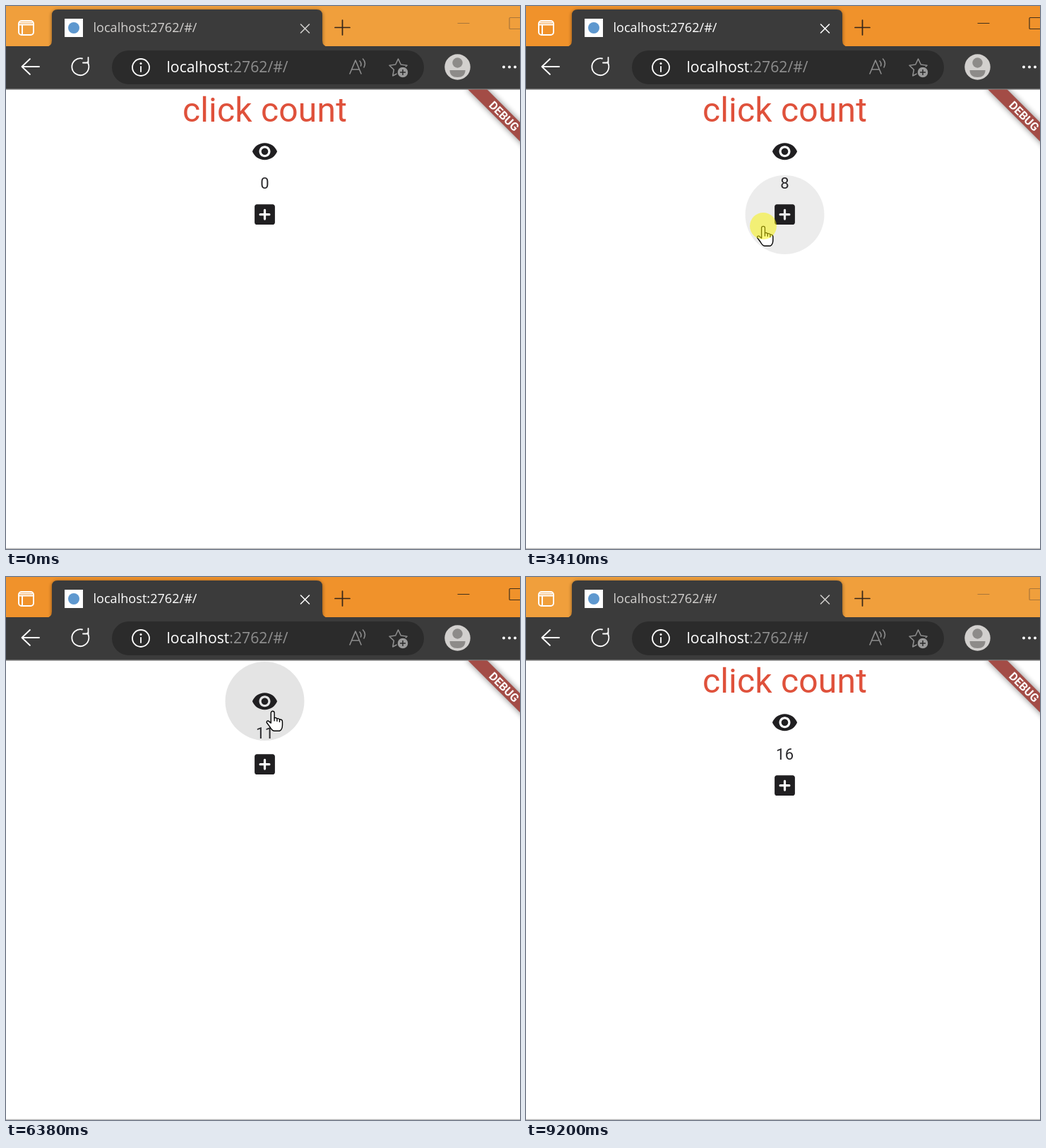
An HTML page that plays this animation: 728 px wide and 770 px high, repeating every 9.27 s.

```html
<!DOCTYPE html>
<html lang="en">
<head>
<meta charset="utf-8">
<title>click count</title>
<style>
  html, body { margin: 0; width: 100%; height: 100%; overflow: hidden; background: #fff; }
  svg { display: block; width: 728px; height: 770px; }
  .ui { font-family: "Open Sans", "Noto Sans", sans-serif; }
  .app { font-family: Roboto, Arial, sans-serif; }
  .line { fill: none; stroke-linecap: round; stroke-linejoin: round; }
</style>
</head>
<body>
<svg viewBox="0 0 728 770" xmlns="http://www.w3.org/2000/svg">
  <defs>
    <filter id="soft" x="-20%" y="-100%" width="140%" height="300%"><feGaussianBlur stdDeviation="4"/></filter>
    <filter id="tabShadow" x="-5%" y="-20%" width="110%" height="140%"><feGaussianBlur stdDeviation="2"/></filter>
    <clipPath id="page"><rect y="118.5" width="728" height="652"/></clipPath>
  </defs>
  <rect width="728" height="770" fill="#fff"/>

  <!-- title bar -->
  <rect id="bar" width="728" height="58"/>
  <rect x="64" y="5" width="385" height="60" rx="9" fill="#000" opacity=".35" filter="url(#tabShadow)"/>
  <path d="M57 58Q65 57 65 49V13Q65 5 73 5H440Q448 5 448 13V49Q448 57 456 58Z" fill="#3b3b3b"/>
  <g class="line" stroke="#fff" stroke-width="1.9">
    <rect x="18" y="21" width="21" height="20" rx="4"/>
    <path d="M18 26.5H39M23 27V40M20 23.6H37"/>
  </g>
  <rect x="83" y="18" width="26" height="26" fill="#fff"/>
  <circle cx="96" cy="31" r="8" fill="#5e98cf"/>
  <text id="tabText" class="ui" x="123.5" y="37" font-size="18.1">localhost:2762/#/</text>
  <path id="tabClose" class="line" d="M417.500 26L429.500 38M429.500 26L417.500 38" stroke-width="1.6"/>
  <path class="line" d="M466 30.500H487M476.500 20V41" stroke="#33251a" stroke-width="1.7"/>
  <g id="winButtons" class="line" stroke-width="1.2">
    <path d="M640 24.500H656"/><rect x="713" y="16.500" width="17" height="16" rx="1"/>
  </g>

  <!-- toolbar -->
  <rect y="57" width="728" height="61" fill="#3b3b3b"/>
  <rect y="117" width="728" height="1.600" fill="#6a6a6a"/>
  <rect x="150" y="63" width="442" height="48" rx="24" fill="#2b2b2b"/>
  <g class="line" stroke="#fff" stroke-width="1.8">
    <path d="M47 86H22.500M34 75L22.500 86L34 97"/>
    <path d="M115.300 79.500A12 12 0 1 1 108 74.500M116.500 73V80.500H109"/>
    <circle cx="191" cy="87" r="12"/>
    <path d="M191 86V93"/>
  </g>
  <circle cx="191" cy="81.500" r="1.500" fill="#fff"/>
  <text class="ui" x="227.500" y="94" font-size="21.200" fill="#fff">localhost<tspan fill="#8f8f8f">:2762/#/</tspan></text>
  <g class="line" stroke="#8d8d8d" stroke-width="1.600">
    <path d="M487 96L495 77L503 96M490 90H500M501 78Q504 81 502.500 85M505.500 75Q510.500 80 507 87"/>
    <path d="M555.500 75L559.300 83L568 84.200L561.700 90.300L563.200 99L555.500 95L547.800 99L549.300 90.300L543 84.200L551.700 83Z"/>
  </g>
  <circle cx="562" cy="94" r="8" fill="#9a9a9a" stroke="#2b2b2b" stroke-width="1.500"/>
  <path d="M558 94H566M562 90V98" stroke="#2b2b2b" stroke-width="1.500"/>
  <circle cx="639.500" cy="86.500" r="18.200" fill="#d2d0ce"/>
  <circle cx="639.500" cy="80.500" r="7.200" fill="#8d8b89"/>
  <path d="M628.500 91H650.500Q650.500 101 639.500 101T628.500 91Z" fill="#8d8b89"/>
  <g fill="#fff"><circle cx="705" cy="86.500" r="2"/><circle cx="713" cy="86.500" r="2"/><circle cx="721" cy="86.500" r="2"/></g>

  <!-- page -->
  <text id="heading" class="app" x="366.500" y="164" font-size="48" letter-spacing=".2" text-anchor="middle" fill="#df513b">click count</text>
  <g id="body">
    <circle id="eyeHover" cx="366.500" cy="206"/>
    <circle id="plusHover" cx="366.500" cy="296"/>
    <g id="ripples"></g>
    <g fill="#201f21" fill-rule="evenodd">
      <path transform="translate(347.300 187) scale(1.600)" d="M12 4.500C7 4.500 2.730 7.610 1 12c1.730 4.390 6 7.500 11 7.500s9.270-3.110 11-7.500c-1.730-4.390-6-7.500-11-7.500zM12 17c-2.760 0-5-2.240-5-5s2.240-5 5-5 5 2.240 5 5-2.240 5-5 5zm0-8c-1.660 0-3 1.340-3 3s1.340 3 3 3 3-1.340 3-3-1.340-3-3-3z"/>
      <path transform="translate(347.300 276.500) scale(1.600)" d="M19 3H5c-1.100 0-2 .9-2 2v14c0 1.100.9 2 2 2h14c1.100 0 2-.9 2-2V5c0-1.100-.9-2-2-2zm-3 10h-3v3c0 .55-.45 1-1 1s-1-.45-1-1v-3H8c-.55 0-1-.45-1-1s.45-1 1-1h3V8c0-.55.45-1 1-1s1 .45 1 1v3h3c.55 0 1 .45 1 1s-.45 1-1 1z"/>
    </g>
    <text id="count" class="app" x="366.700" y="259" font-size="22" letter-spacing=".4" text-anchor="middle" fill="#2b2a2d"></text>
  </g>
  <g clip-path="url(#page)">
    <g transform="translate(705.500 156) rotate(45)">
      <rect x="-64" y="-9.600" width="128" height="19.200" opacity=".5" filter="url(#soft)"/>
      <rect x="-64" y="-9.600" width="128" height="19.200" fill="#a34c46"/>
      <text class="app" y="5.800" font-size="16.300" font-weight="700" text-anchor="middle" fill="#fff">DEBUG</text>
    </g>
  </g>
  <rect y="768.800" width="728" height="1.200" fill="#b9b9b9"/>

  <!-- pointer -->
  <g id="pointer">
    <g id="hand" class="line" stroke="#000" stroke-width="1.400">
      <path fill="#fff" d="M-2.400 2.800A2.400 2.400 0 0 1 2.400 2.800V10Q4.600 8.800 6.200 11Q8.600 10 9.800 12.200Q13.800 11.600 13.800 15.500V20Q13.800 26 10 28.300H2Q-1 28-4 22.500L-8.400 16.600Q-8.800 13.800-6 14.200L-2.400 17.200Z"/>
      <path d="M2.400 10V14M6.200 11V14.500M9.800 12.200V15.500"/>
    </g>
    <path id="arrow" d="M.5 .5V23L5.600 18.200L9 26.300L12.500 24.800L9.200 17H16.500Z" fill="#fff" stroke="#000" stroke-width="1.200"/>
    <circle id="glow" r="19" fill="#faf40a" opacity=".52"/>
  </g>
</svg>
<script>
const LOOP = 9270, CX = 366.5, EYE = 206, PLUS = 296, LIFT = 30;
const $ = id => document.getElementById(id);
const set = (el, attrs) => { for (const k in attrs) el.setAttribute(k, attrs[k]); };
const show = (el, on) => set(el, { visibility: on ? "inherit" : "hidden" });
const clamp = v => Math.max(0, Math.min(1, v));
const series = (start, step, n) => Array.from({ length: n }, (_, i) => start + step * i);

// Pointer stops: time, x, y
const path = [
  [300, 712, 785], [370, 690, 735], [510, 580, 650], [760, 500, 430], [1050, 403, 190],
  [1190, 384, 158], [1260, 384, 151], [1470, 364, 274], [1640, 364, 282], [2380, 368, 284],
  [2720, 368, 284], [2900, 372, 325], [3060, 368, 358], [3200, 350, 339], [3410, 336, 312],
  [3700, 340, 302], [3960, 345, 301], [4190, 345, 301], [4400, 388, 205], [4590, 372, 176],
  [5490, 372, 175], [6310, 372, 175], [6410, 380, 196], [6510, 371, 179], [6780, 371, 179],
  [7060, 369, 230], [7340, 365, 308], [7600, 365, 304], [8240, 365, 300], [8400, 500, 490],
  [8520, 692, 726], [8730, 699, 772]
];

function pointerAt(t) {
  let i = 1;
  while (i < path.length - 1 && t > path[i][0]) i++;
  const a = path[i - 1], b = path[i];
  const p = clamp((t - a[0]) / (b[0] - a[0]));
  return [1, 2].map(k => a[k] + (b[k] - a[k]) * p);
}

const press = (y, hold) => down => ({ y, down, up: down + hold });
const plusPresses = [
  ...[...series(1660, 120, 7), 2780, 3410, 3740].map(press(PLUS, 60)),
  press(PLUS, 160)(4030),
  ...series(7620, 130, 5).map(press(PLUS, 60))
];
const eyePresses = [
  ...[4870, 5530, 6030].map(press(EYE, 70)),
  press(EYE, 270)(6510)
];
const presses = [...plusPresses, ...eyePresses];
const focusClick = press(0, 80)(510);
const done = (list, t) => list.filter(p => t >= p.up).length;

const ripples = presses.map(p => {
  const el = document.createElementNS("http://www.w3.org/2000/svg", "circle");
  $("ripples").append(el);
  return { ...p, el, from: pointerAt(p.down), lift: done(eyePresses, p.down) % 2 * LIFT };
});

const hover = (t, spans) => Math.max(...spans.map(([a, b]) =>
  Math.min(clamp((t - a) / 100), clamp((b - t) / 100))));

function drawRipple(r, t) {
  const age = t - r.down, on = age >= 0 && age < 600;
  show(r.el, on);
  if (!on) return;
  const grow = clamp(age / 225), move = grow ** .45;
  const fromY = r.from[1] + r.lift;
  set(r.el, {
    cx: r.from[0] + (CX - r.from[0]) * move,
    cy: fromY + (r.y - fromY) * move,
    r: 17 + 39 * grow ** .85,
    opacity: .055 * clamp(age / 60) * clamp((600 - age) / 375)
  });
}

function draw(t) {
  const active = t >= 510 && t < 9200;
  set($("bar"), { fill: active ? "#f0922b" : "#f09f3c" });
  set($("tabText"), { fill: active ? "#fff" : "#d2d0ce" });
  set($("tabClose"), { stroke: active ? "#fff" : "#d2d0ce" });
  set($("winButtons"), { stroke: active ? "#40301c" : "#a9763a" });

  const hidden = done(eyePresses, t) % 2 === 1;
  const lift = hidden ? LIFT : 0;
  show($("heading"), !hidden);
  set($("body"), { transform: `translate(0 ${-lift})` });
  $("count").textContent = done(plusPresses, t);

  set($("eyeHover"), { r: 56, opacity: .075 * hover(t, [[4420, 7060]]) });
  set($("plusHover"), { r: 56, opacity: .073 * hover(t, [[1405, 3060], [3220, 4350], [7180, 8380]]) });
  ripples.forEach(r => drawRipple(r, t));

  const [x, y] = pointerAt(t);
  const over = [EYE, PLUS].some(cy => Math.abs(x - CX) < 32 && Math.abs(y - cy + lift) < 33);
  show($("pointer"), t >= 300 && t < 8730);
  set($("pointer"), { transform: `translate(${x} ${y})` });
  show($("hand"), over);
  show($("arrow"), !over);
  show($("glow"), [...presses, focusClick].some(p => t >= p.down && t < p.up));
}

function tick() {
  draw(performance.now() % LOOP);
  requestAnimationFrame(tick);
}
tick();
</script>
</body>
</html>
```
